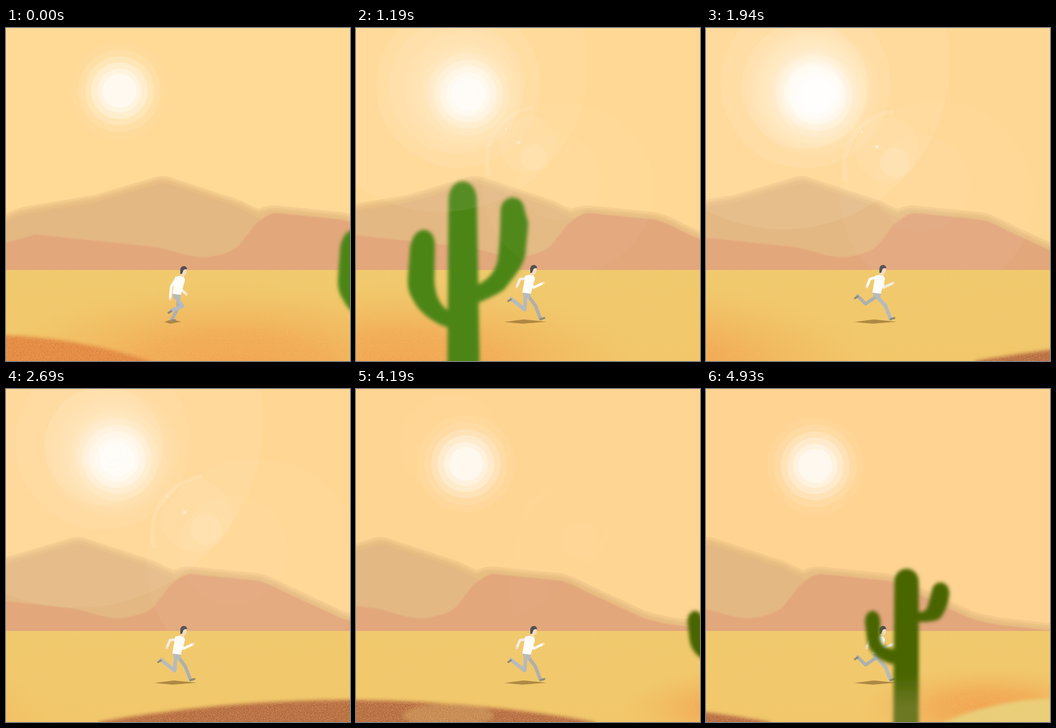
An HTML page that plays this animation: 608x589 px, repeating every 5030 ms.

```html
<!DOCTYPE html>
<html lang="en">
<head>
<meta charset="utf-8">
<title>Desert run</title>
<style>
html, body { margin: 0; width: 100%; height: 100%; overflow: hidden; background: #ffd996; }
svg { display: block; width: 100vw; height: 100vh; }
</style>
</head>
<body>
<svg id="stage" viewBox="0 0 608 589" preserveAspectRatio="none">
  <defs>
    <filter id="soft" x="-20%" y="-20%" width="140%" height="140%"><feGaussianBlur stdDeviation="3.2"/></filter>
    <filter id="edge"><feGaussianBlur stdDeviation="0.9"/></filter>
    <filter id="grain" x="0" y="0" width="100%" height="100%">
      <feTurbulence type="fractalNoise" baseFrequency="0.85" numOctaves="2" seed="4"/>
      <feColorMatrix values="0 0 0 0 .87  0 0 0 0 .54  0 0 0 0 .23  1.7 0 0 0 -.72"/>
    </filter>
    <linearGradient id="sand" x1="0" y1="0" x2="0" y2="1">
      <stop offset="0" stop-color="#f0cb69"/><stop offset="1" stop-color="#f2c866"/>
    </linearGradient>
    <radialGradient id="heat">
      <stop offset="0" stop-color="#f2a04a"/>
      <stop offset=".4" stop-color="#f2a44d" stop-opacity=".8"/>
      <stop offset="1" stop-color="#f2b858" stop-opacity="0"/>
    </radialGradient>
    <radialGradient id="glow">
      <stop offset="0" stop-color="#fff" stop-opacity=".95"/>
      <stop offset=".35" stop-color="#fff" stop-opacity=".75"/>
      <stop offset=".6" stop-color="#fff" stop-opacity=".3"/>
      <stop offset="1" stop-color="#fff" stop-opacity="0"/>
    </radialGradient>
    <linearGradient id="oldGreen" gradientUnits="userSpaceOnUse" x1="0" y1="505" x2="0" y2="560">
      <stop offset="0" stop-color="#496500"/><stop offset="1" stop-color="#6c7822"/>
    </linearGradient>
    <clipPath id="aboveGround"><rect width="608" height="428"/></clipPath>
  </defs>

  <rect id="sky" width="608" height="589"/>
  <g id="sun" fill="#fff"></g>

  <g id="hills">
    <g id="haze" fill="none" stroke="#dfb27d" stroke-linejoin="round"></g>
    <g filter="url(#edge)">
      <path fill="#e4b882" d="M-20 352L0 344Q18 332 40 328L160 308L262 278Q277 272 292 278L410 317Q432 329 450 336L480 440H-20Z"/>
      <path fill="#e3a77c" d="M-20 386L0 380L52 365L270 388L300 396Q340 409 365 404Q405 396 415 380L440 348Q462 328 477 327L595 339Q612 343 640 358L739 404Q765 413 800 418L890 428V440H-20Z"/>
    </g>
  </g>

  <rect y="428" width="608" height="161" fill="url(#sand)"/>
  <g id="ground">
    <ellipse id="heatA" cy="600" rx="430" ry="150" fill="url(#heat)"/>
    <ellipse id="heatB" cy="565" rx="230" ry="75" fill="url(#heat)"/>
    <g filter="url(#soft)">
      <path id="orangeDune" fill="#e2833b"/>
      <path id="lightDune" fill="#e9d076"/>
      <path id="brownDune" fill="#b1653a"/>
      <ellipse id="dust" cy="577" rx="80" ry="20" fill="#cb995b" opacity=".6"/>
    </g>
  </g>
  <rect y="428" width="608" height="161" filter="url(#grain)"/>

  <g id="runner" fill="none" stroke-linecap="round" stroke-linejoin="round">
    <path id="shadow" fill="#8a672e" opacity=".65"/>
    <path id="farArm" stroke="#f4ede2" stroke-width="4.5"/>
    <path id="farLeg" stroke="#adb0ae" stroke-width="6"/>
    <path id="nearLeg" stroke="#b6babd" stroke-width="6.5"/>
    <path id="farShoe" stroke="#8f8a72" stroke-width="3.4"/>
    <path id="nearShoe" stroke="#8f8a72" stroke-width="3.4"/>
    <path id="hips" fill="#b6babd"/>
    <path id="torso" fill="#fffdf9"/>
    <path id="nearArm" stroke="#fffdf9" stroke-width="4.5"/>
    <g id="hands" fill="#f5dcc0"><circle r="2.2"/><circle r="2.2"/></g>
    <g id="head">
      <path fill="#f3dcc2" d="M-4 1L5 -2L5.5 4Q4 9 1 9V12H-5Z"/>
      <path fill="#505050" d="M-6 7V-1Q-5 -7 1 -7Q6 -6 6 -1Q0 -2 -1 2L-3 7Z"/>
    </g>
  </g>

  <g id="cactusA" fill="#4c8518" filter="url(#soft)">
    <path d="M407 600L409 305C409 260 459 260 459 305L464 600Z"/>
    <path d="M412 531C380 522 355 500 346 480Q336 465 337 445L341 388Q347 358 365 357Q383 358 385 382L384 445C386 480 397 493 413 503Z"/>
    <path d="M456 456C480 446 492 430 496 410Q500 380 501 325C501 293 540 292 543 320L550 345L545 400C540 425 520 445 508 462Q490 475 456 488Z"/>
  </g>
  <g id="cactusB" fill="#496500" filter="url(#soft)">
    <path fill="url(#oldGreen)" d="M331 600L333 342C333 310 376 310 376 342V600Z"/>
    <path d="M335 488C298 480 285 460 284 437L281 412C281 386 308 386 308 412V440Q309 459 335 460Z"/>
    <path d="M372 394Q388 397 392 384L400 354C404 336 432 338 430 364Q427 388 415 404Q408 413 372 412Z"/>
  </g>

  <g id="flare" fill="#fff" clip-path="url(#aboveGround)"></g>
</svg>

<script>
const $ = id => document.getElementById(id);
const set = (el, attrs) => { for (const k in attrs) el.setAttribute(k, attrs[k]); return el; };
const add = (parent, tag, attrs) =>
  parent.appendChild(set(document.createElementNS('http://www.w3.org/2000/svg', tag), attrs));

const LOOP = 5030, LAST = 33;
const SPEED = 0.416;

// The film is shot on held frames of 150 ms, two of them 10 ms shorter.
const startOf = i => i * 150 - (i > 4 ? 10 : 0) - (i > 29 ? 10 : 0);

function track(points, t) {
  for (let i = 1; i < points.length; i++) {
    const [t0, v0] = points[i - 1], [t1, v1] = points[i];
    if (t <= t1) return v0 + (v1 - v0) * (t - t0) / (t1 - t0);
  }
  return points[points.length - 1][1];
}

// Sun rings: radius, opacity
[[86, .05], [73, .1], [61, .2], [50, .3], [39, .35], [30, .5]]
  .forEach(([r, opacity]) => add($('sun'), 'circle', { r, opacity }));

const ridge = 'M-20 350L0 344Q18 332 40 328L160 308L262 278Q277 272 292 278L410 317Q432 329 448 334' +
  'Q462 326 477 327L595 339Q612 343 640 358L739 404Q765 413 800 418L890 428';
[26, 18, 11].forEach(w => add($('haze'), 'path', { d: ridge, 'stroke-width': w, opacity: .34 }));

// Flare parts: position and radius at 1940 ms with drift per ms
const flareParts = [
  { x: 137, y: 62, r: 294, vx: -.017, vy: -.006, vr: .047, o: .08 },
  { x: 176, y: 98, r: 150, vx: -.007, vy: -.005, vr: .006, o: .09 },
  { x: 175, y: 102, r: 112, vx: -.003, vy: -.002, vr: -.01, o: .1 },
  { x: 408, y: 300, r: 168, vx: .0435, vy: .021, vr: .028, o: .035, ring: 6 },
  { x: 380, y: 275, r: 84, vx: .0287, vy: .0133, vr: .014, o: .03, ring: 3 },
  { x: 320, y: 215, r: 57, vx: .022, vy: .012, vr: .009, o: .06 },
  { x: 334, y: 238, r: 26, vx: .027, vy: .013, vr: .003, o: .11 },
  { x: 302, y: 210, r: 3, vx: .019, vy: .0102, vr: 0, o: .5 },
  { x: 275, y: 184, r: 1.6, vx: .0135, vy: .0075, vr: 0, o: .6 }
];
const glow = add($('flare'), 'circle', { r: 118, fill: 'url(#glow)' });
for (const p of flareParts) {
  p.el = add($('flare'), 'circle', { opacity: p.o });
  if (p.ring) set(p.el, { stroke: '#fff', 'stroke-width': p.ring });
}
const crescent = add($('flare'), 'path', { fill: 'none', stroke: '#fff', 'stroke-width': 8, opacity: .12 });

function drawFlare(t) {
  const level = track([[0, 0], [600, .55], [1190, .8], [1940, 1], [2700, .85], [3440, .45], [4190, .06], [4500, 0]], t);
  const dt = t - 1940;
  set($('flare'), { opacity: level });
  set(glow, { cx: 188 - dt * .001, cy: 111 + dt * .002, opacity: level * level });
  for (const p of flareParts)
    set(p.el, { cx: p.x + p.vx * dt, cy: p.y + p.vy * dt, r: Math.max(1, p.r + p.vr * dt) });
  const x = 346 + .022 * dt, y = 246 + .013 * dt, r = 98 + .004 * dt;
  set(crescent, { d: `M${x - r} ${y + 25}A${r} ${r} 0 0 1 ${x - 15} ${y - r}` });
}

// One stride of ten poses per limb: middle joint, then end joint.
const legCycle = [
  [317, 491, 326, 514], [308, 490, 297, 515], [304, 495, 293, 516], [297, 494, 281, 513], [290, 492, 272, 497],
  [282, 488, 268, 474], [304, 490, 289, 499], [312, 492, 292, 500], [320, 488, 305, 505], [322, 489, 318, 511]
];
const armCycle = [
  [314, 459, 331, 451], [309, 466, 323, 476], [292, 458, 290, 479], [290, 452, 286, 470], [290, 447, 284, 461],
  [290, 444, 284, 458], [302, 460, 306, 470], [308, 461, 319, 471], [311, 460, 325, 460], [313, 459, 329, 453]
];
const highTrail = [298, 498, 274, 479];
const headY = [426, 432, 428, 425, 425];
const shadowEnds = [[262, 337], [275, 322], [280, 310], [272, 320], [265, 330]];

const limb = (x, y, [a, b, c, d]) => `M${x} ${y}L${a} ${b}L${c} ${d}`;

function shoe([kx, ky, ax, ay], planted) {
  const toe = planted ? [7, -2] : ay > 510 ? [6, 0] : [-5, 3];
  return `M${ax} ${ay + 1}l${toe[0]} ${toe[1]}`;
}

function drawRunner(frame) {
  const step = (frame + 7) % 10, beat = step % 5, other = (step + 5) % 10;
  const near = legCycle[step];
  const far = other === 5 ? legCycle[5] : step === 5 ? legCycle[0] : legCycle[other];
  const nearLeg = step === 5 ? highTrail : near;
  const top = headY[beat] + 11, hip = top + 33;
  const headX = step === 0 ? 312.5 : 314;

  set($('head'), { transform: `translate(${headX} ${headY[beat]})` });
  set($('torso'), { d: `M299 ${top + 1}L308 ${top - 1}Q317 ${top + 1} 316 ${top + 8}L309 ${hip}L294 ${hip - 2}Z` });
  set($('hips'), { d: `M294 ${hip - 4}L309 ${hip - 2}L308 ${hip + 8}L297 ${hip + 7}Z` });
  set($('nearLeg'), { d: limb(300, hip + 3, nearLeg) });
  set($('farLeg'), { d: limb(304, hip + 3, far) });
  set($('nearShoe'), { d: shoe(nearLeg, step === 0) });
  set($('farShoe'), { d: shoe(far, step === 5) });

  const nearArm = armCycle[other], farArm = armCycle[step];
  set($('nearArm'), { d: limb(beat === 1 ? 306 : 301, top + 4, nearArm) });
  set($('farArm'), { d: limb(312, top + 5, farArm) });
  [nearArm, farArm].forEach((a, i) => set($('hands').children[i], { cx: a[2], cy: a[3] }));
  // While the arms cross, the front one lies over the torso.
  $('runner').insertBefore($('farArm'), beat === 1 ? $('hands') : $('farLeg'));

  const [l, r] = shadowEnds[beat];
  set($('shadow'), { d: `M${l} 520L${(l + r) / 2 - 3} 515.5L${r} 519.5L${(l + r) / 2 - 5} 523Z` });
}

const dune = (c, w, top) => `M${c - w} 589Q${c} ${2 * top - 589} ${c + w} 589V620H${c - w}Z`;

function drawGround(t) {
  const brown = 293 - SPEED * (t - 3440);
  set($('heatA'), { cx: 400 - .27 * t });
  set($('heatB'), { cx: 700 - .27 * (t - 4190) });
  set($('orangeDune'), { d: dune(-30 - SPEED * t, 285, 543) });
  set($('lightDune'), { d: dune(620 - SPEED * (t - 4930), 200, 547) });
  set($('brownDune'), { d: dune(brown, 441, 550) });
  set($('dust'), { cx: brown + 182 });
}

function draw(frame) {
  const t = startOf(frame), p = t / 4930;
  set($('sky'), { fill: `rgb(255,${217 - 5 * p},${150 - 4 * p})` });
  set($('sun'), { transform: `translate(${200.5 - 7.5 * p} ${111 + 25 * p})` });
  set($('hills'), { transform: `translate(${-275 * p} 0)` });
  drawGround(t);
  drawRunner(frame);
  set($('cactusA'), { transform: `translate(${SPEED * (600 - t)} 0)` });
  set($('cactusB'), { transform: `translate(${.412 * (4930 - t)} 0)` });
  drawFlare(t);
}

let shown = -1;
const begin = performance.now();
function tick() {
  const t = (performance.now() - begin) % LOOP;
  let frame = LAST;
  while (startOf(frame) > t) frame--;
  if (frame !== shown) draw(shown = frame);
  requestAnimationFrame(tick);
}
tick();
</script>
</body>
</html>
```
